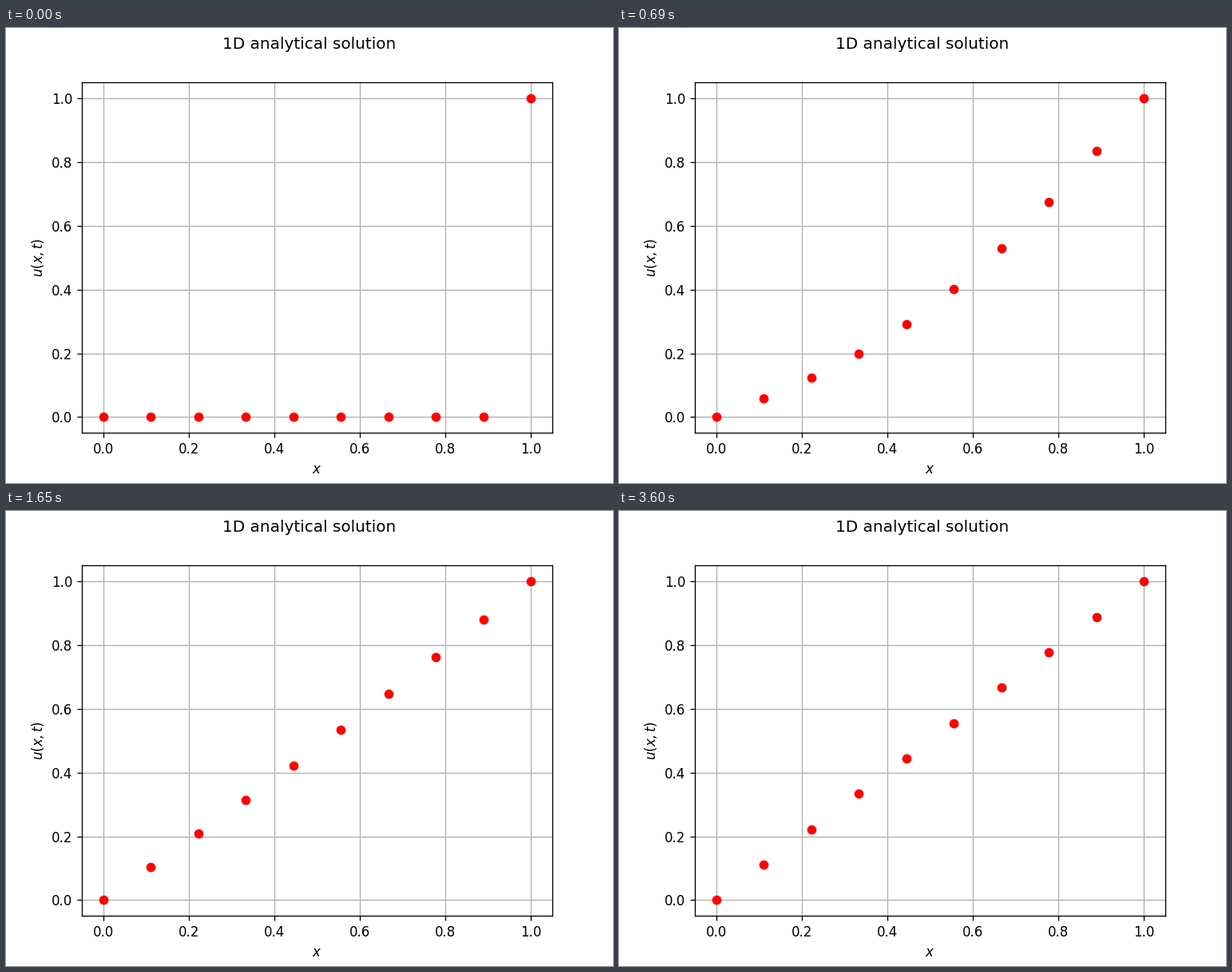
Recreate the animation shown at these times as a matplotlib script. Size 760 by 570 pixels, loop 4860 ms.

```python
import numpy as np
import matplotlib.pyplot as plt
from matplotlib.animation import FuncAnimation

DPI = 120
FRAMES = 162
INTERVAL = 30  # ms

x = np.linspace(0, 1, 10)
dt = (x[1] - x[0]) ** 2 / 2
modes = np.arange(1, 101)[:, None]


def heat(t):
    """Heat equation on [0, 1] with u(0) = 0, u(1) = 1 and a cold start."""
    if t == 0:
        return np.where(x == 1, 1.0, 0.0)
    amplitude = 2 * (-1.0) ** modes / (modes * np.pi)
    decay = np.exp(-(modes * np.pi) ** 2 * t)
    return x + (amplitude * decay * np.sin(modes * np.pi * x)).sum(axis=0)


plt.rcParams["font.family"] = "DejaVu Sans"
fig, ax = plt.subplots(figsize=(760 / DPI, 570 / DPI), dpi=DPI)
fig.suptitle("1D analytical solution")
ax.set(xlim=(-0.05, 1.05), ylim=(-0.05, 1.05), xlabel="$x$", ylabel="$u(x,t)$")
ax.grid()
points, = ax.plot(x, heat(0), "ro")


def update(frame):
    points.set_ydata(heat(frame * dt))
    return points,


anim = FuncAnimation(fig, update, frames=FRAMES, interval=INTERVAL,
                     repeat=True, repeat_delay=0)
plt.show()
```
